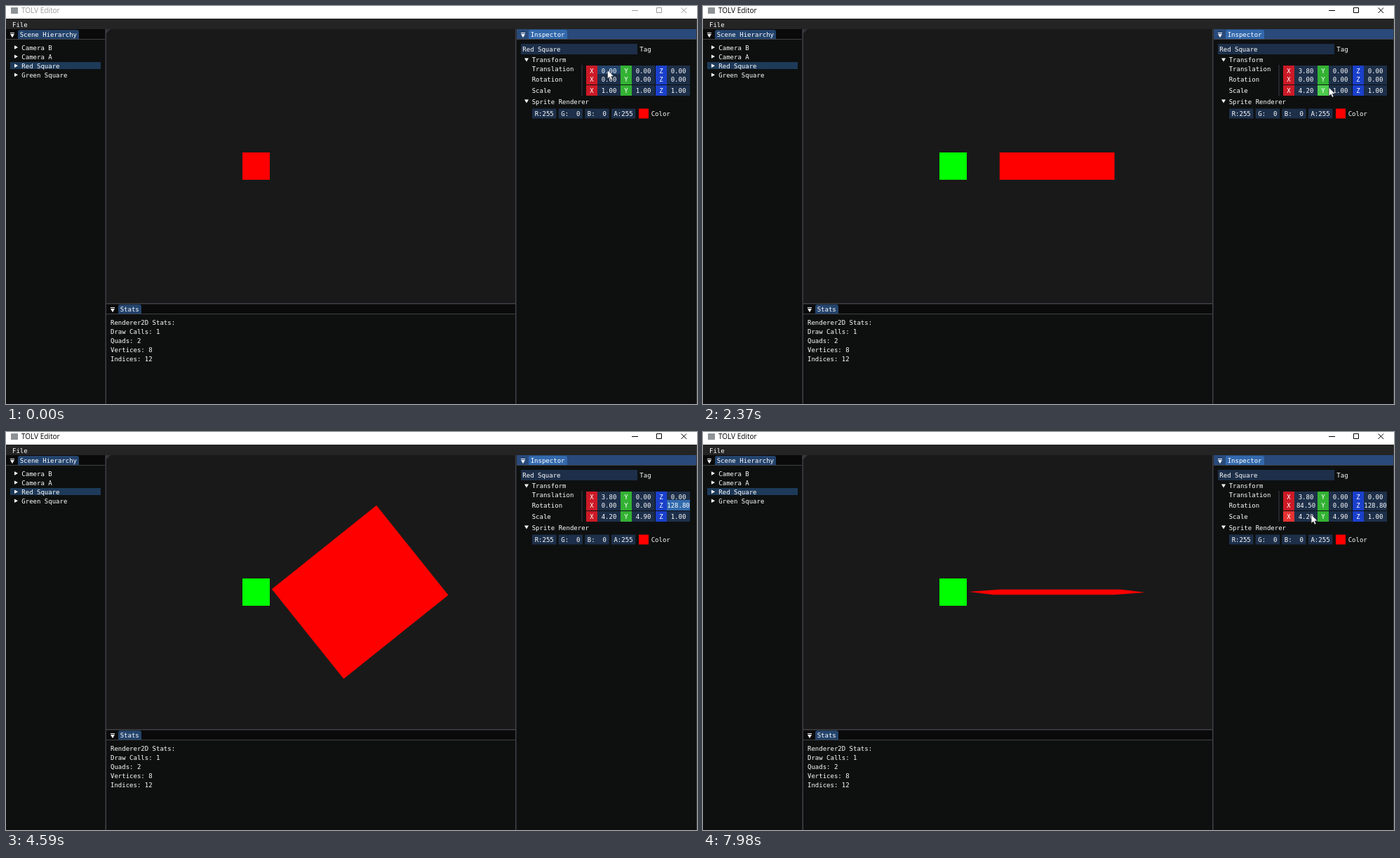
These frames come from a looping animation (985 px wide and 568 px high, 8000 ms). An HTML page with a canvas:

```html
<!DOCTYPE html>
<html lang="en">
<head>
<meta charset="utf-8">
<title>Scene editor</title>
<style>
  html, body { margin: 0; width: 100%; height: 100%; overflow: hidden; background: #0e1010; }
  canvas { display: block; }
</style>
</head>
<body>
<canvas id="stage" width="985" height="568"></canvas>
<script>
const ctx = document.getElementById('stage').getContext('2d');
const LOOP = 8000, UNIT = 39, CENTER_X = 356.5, CENTER_Y = 228.5;
const MONO = '9px "DejaVu Sans Mono", monospace';
const FIELD = '#1d2f49', HOVER = '#24456d', ACTIVE = '#316aad';
const TAB = '#23436c', SPLIT = '#404047';
const AXES = [
  { name: 'X', color: '#cc1a26', lit: '#e63333' },
  { name: 'Y', color: '#33b233', lit: '#4dcc4d' },
  { name: 'Z', color: '#1a40cc', lit: '#3359e6' }
];
const ROWS = [
  { label: 'Translation', y: 85, labelY: 90 },
  { label: 'Rotation', y: 97, labelY: 105 },
  { label: 'Scale', y: 113, labelY: 120.5 }
];
const ROW_H = 15, BUTTON_W = 16, FIELD_W = 33;

const smooth = k => k * k * (3 - 2 * k);
const accelerate = k => k ** 1.745;
const overshoot = k => 1 + 5.8 * (k - 1) ** 3 + 4.8 * (k - 1) ** 2;
const ramp = (t, [from, to], ease) => ease(Math.min(1, Math.max(0, (t - from) / (to - from))));
const mix = (a, b, k) => a + (b - a) * k;

// The pointer glides to (x, y), then drags sideways to add `gain` to one field.
const DRAGS = [
  { row: 0, col: 0, x: 857.5, y: 91.5, glide: [-2, -1], drag: [100, 560], release: 780, gain: 3.8 },
  { row: 2, col: 0, x: 865, y: 116, glide: [780, 1400], drag: [1630, 2200], release: 2310, gain: 3.2 },
  { row: 2, col: 1, x: 897, y: 117, glide: [2310, 2500], drag: [2550, 3250], release: 3290, gain: 3.9 },
  { row: 1, col: 2, x: 946, y: 106, glide: [3290, 3620], drag: [3850, 4590], release: 4950, gain: 128.8 },
  { row: 1, col: 0, x: 858, y: 105, glide: [5380, 6170], drag: [6270, 7090], release: 7320, gain: 84.5, ease: accelerate },
  { row: 2, col: 0, x: 868, y: 118, glide: [7550, LOOP], drag: [LOOP + 50, LOOP + 60], release: LOOP + 60, gain: 0 }
];
const PRESS_LEAD = 50, PIXELS_PER_UNIT = 8;
const pressTime = d => d.drag[0] - PRESS_LEAD;
const dragged = (d, t) => d.gain * ramp(t, d.drag, d.ease || smooth);

function transformAt(t) {
  const values = [[0, 0, 0], [0, 0, 0], [1, 1, 1]];
  for (const d of DRAGS) values[d.row][d.col] += Math.round(dragged(d, t) * 10) / 10;
  return values;
}

function pointerAt(t) {
  let x = Infinity, y = 0;
  for (const d of DRAGS) {
    if (t < d.glide[0]) break;
    const outside = x > 985;
    const k = ramp(t, d.glide, outside ? overshoot : smooth);
    x = mix(outside ? 978 : x, d.x, k) + PIXELS_PER_UNIT * dragged(d, t);
    y = mix(outside ? d.y + 10 : y, d.y, k);
  }
  return [x, y];
}

function box(x, y, w, h, color) {
  ctx.fillStyle = color;
  ctx.fillRect(x, y, w, h);
}
function shape(points, color) {
  ctx.beginPath();
  points.forEach(p => ctx.lineTo(p[0], p[1]));
  ctx.closePath();
  ctx.fillStyle = color;
  ctx.fill();
}
function text(str, x, midY, align = 'left') {
  ctx.font = MONO;
  ctx.textAlign = align;
  ctx.fillStyle = '#fff';
  ctx.fillText(str, x, midY + 3.2);
}
const arrowDown = (x, y) => shape([[x, y - 2], [x + 6, y - 2], [x + 3, y + 3]], '#fff');
const arrowRight = (x, y) => shape([[x, y - 2.7], [x + 5, y], [x, y + 2.7]], '#fff');
const textLines = (lines, x, y) => lines.forEach((line, i) => text(line, x, y + i * 13.1));

function panelTitle(x, y, w, label, tabWidth, bar, tab) {
  box(x, y, w, 14, bar);
  ctx.beginPath();
  ctx.roundRect(x + 17, y + 1, tabWidth, 13, [3, 3, 0, 0]);
  ctx.fillStyle = tab;
  ctx.fill();
  box(x, y + 14, w, 1, SPLIT);
  box(x + 6, y + 5, 6, 1, '#fff');
  arrowDown(x + 6, y + 9);
  text(label, x + 19.7, y + 8.1);
}

function titleBar(focused) {
  const ink = focused ? '#000' : '#999';
  box(0, 0, 985, 18, '#fff');
  box(7, 2, 10, 9, '#8d9296');
  ctx.font = '10px "Open Sans", sans-serif';
  ctx.textAlign = 'left';
  ctx.fillStyle = ink;
  ctx.fillText('TOLV Editor', 22, 10.3);
  ctx.strokeStyle = ink;
  ctx.lineWidth = 1;
  ctx.beginPath();
  ctx.moveTo(892, 6.5); ctx.lineTo(901, 6.5);
  ctx.rect(927.5, 2.5, 7, 7);
  ctx.moveTo(962.5, 2.5); ctx.lineTo(970, 10);
  ctx.moveTo(970, 2.5); ctx.lineTo(962.5, 10);
  ctx.stroke();
  box(0, 18, 985, 15, '#242424');
  text('File', 9, 26.3);
}

function hierarchy() {
  const names = ['Camera B', 'Camera A', 'Red Square', 'Green Square'];
  panelTitle(0, 33, 141, 'Scene Hierarchy', 87, '#0a0a0a', TAB);
  box(6, 80, 129, 10, '#1e3a59');
  names.forEach((_, i) => arrowRight(12, 59 + i * 13.1));
  textLines(names, 22.3, 59.5);
}

function stats() {
  panelTitle(143, 425, 583, 'Stats', 33, '#0a0a0a', TAB);
  textLines(['Renderer2D Stats:', 'Draw Calls: 1', 'Quads: 2', 'Vertices: 8', 'Indices: 12'], 149, 451.5);
}

// Keeps the part of a polygon where sign * z <= 1
function clipDepth(points, sign) {
  return points.flatMap((p, i) => {
    const q = points[(i + 1) % points.length];
    const dp = 1 - sign * p[2], dq = 1 - sign * q[2];
    const kept = dp >= 0 ? [p] : [];
    if (dp * dq < 0) kept.push(p.map((v, n) => mix(v, q[n], dp / (dp - dq))));
    return kept;
  });
}

function quad([move, turn, scale], color) {
  const tilt = turn[0] * Math.PI / 180, roll = turn[2] * Math.PI / 180;
  const corners = [[-.5, -.5], [.5, -.5], [.5, .5], [-.5, .5]].map(([u, v]) => {
    const a = u * scale[0], b = v * scale[1];
    const x = a * Math.cos(roll) - b * Math.sin(roll);
    const y = a * Math.sin(roll) + b * Math.cos(roll);
    return [x + move[0], y * Math.cos(tilt), y * Math.sin(tilt)];
  });
  const visible = clipDepth(clipDepth(corners, 1), -1);
  shape(visible.map(([x, y]) => [CENTER_X + x * UNIT, CENTER_Y - y * UNIT]), color);
}

function viewport(t) {
  box(143, 33, 583, 391, '#191919');
  shape([[143, 33], [149, 33], [143, 39]], '#333338');
  quad(transformAt(0), '#0f0');
  quad(transformAt(t - 14), '#f00'); // the scene trails the widgets by one tick
}

function transformRows(t) {
  const values = transformAt(t);
  const late = t - 50;
  const held = DRAGS.find(d => late >= pressTime(d) && late < d.release);
  const [px, py] = pointerAt(Math.max(0, t - 100));
  ROWS.forEach(({ label, y, labelY }, r) => {
    const over = (x, w) => !held && px >= x && px < x + w && py >= y && py < y + ROW_H;
    text(label, 749.7, labelY);
    AXES.forEach((axis, c) => {
      const x = Math.round(827 + c * 49.3), fx = x + BUTTON_W;
      const active = held && held.row === r && held.col === c;
      box(x, y, BUTTON_W, ROW_H, over(x, BUTTON_W) ? axis.lit : axis.color);
      box(fx, y, FIELD_W, ROW_H, active ? ACTIVE : over(fx, FIELD_W) ? HOVER : FIELD);
      text(axis.name, x + BUTTON_W / 2, y + 7.7, 'center');
      text(values[r][c].toFixed(2), fx + FIELD_W / 2, y + 7.7, 'center');
    });
  });
}

function inspector(t) {
  panelTitle(728, 33, 256, 'Inspector', 55, '#294a7a', '#3369ad');
  box(734, 54, 166, 15, FIELD);
  text('Red Square', 736.3, 61.8);
  text('Tag', 903.3, 61.8);
  arrowDown(739, 76.5);
  text('Transform', 749.7, 77.2);
  box(820.5, 84, 1, 44, '#3b3b42');
  transformRows(t);
  arrowDown(739, 135.5);
  text('Sprite Renderer', 749.7, 136.3);
  ['R:255', 'G:  0', 'B:  0', 'A:255'].forEach((channel, i) => {
    const x = 750 + i * 37.6;
    box(x, 146.5, 34.5, 14, FIELD);
    text(channel, x + 17.2, 153.8, 'center');
  });
  box(902, 146.5, 14, 14, '#f00');
  text('Color', 919.7, 153.8);
}

function pointer(t) {
  const [x, y] = pointerAt(t);
  const click = DRAGS.find(d => t >= pressTime(d) && t < pressTime(d) + 300);
  if (click) {
    ctx.globalAlpha = 0.75 * (1 - (t - pressTime(click)) / 300);
    ctx.beginPath();
    ctx.arc(x, y + 1, 9.3, 0, 7);
    ctx.fillStyle = '#f0e01e';
    ctx.fill();
    ctx.globalAlpha = 1;
  }
  const outline = [[0, 0], [0, 12.3], [2.9, 9.8], [4.8, 14], [6.8, 13.1], [5, 9], [8.8, 8.8]];
  shape(outline.map(p => [x + p[0], y + p[1]]), '#fff');
  ctx.strokeStyle = '#222';
  ctx.lineWidth = 0.6;
  ctx.stroke();
}

function draw(t) {
  box(0, 0, 985, 568, '#0e1010');
  titleBar(t >= pressTime(DRAGS[0]));
  hierarchy();
  viewport(t);
  stats();
  inspector(t);
  box(141.5, 33, 1.5, 535, SPLIT);
  box(726, 33, 1.5, 535, SPLIT);
  box(143, 424, 583, 1.5, SPLIT);
  box(984, 18, 1, 550, '#3a3a3c');
  pointer(t);
}

function tick() {
  draw(performance.now() % LOOP);
  requestAnimationFrame(tick);
}
tick();
</script>
</body>
</html>
```
